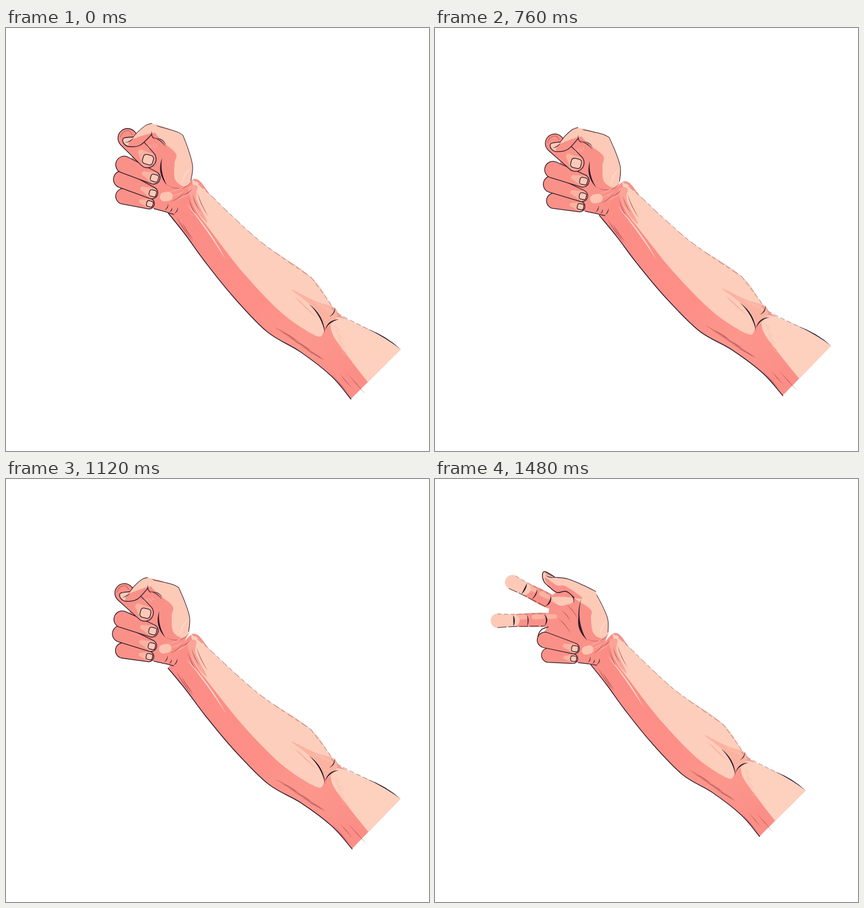
An HTML page with a canvas for the animation above (1.66 s loop, 748 by 749 pixels).

```html
<!DOCTYPE html>
<html lang="en">
<head>
<meta charset="utf-8">
<title>Fist game arm</title>
<style>
html, body { margin: 0; width: 100%; height: 100%; overflow: hidden; background: #fff; }
canvas { display: block; width: 748px; height: 749px; }
</style>
</head>
<body>
<canvas id="stage" width="748" height="749"></canvas>
<script>
const ctx = document.getElementById("stage").getContext("2d");
const INK = "#2b1829", FAINT = "#8d6a6b", RED = "#b4545a";
const HAND = "#fa9188", SOFT = "#fbb3a1", LIGHT = "#fdcab7", PALE = "#fdd9ca";

const HOLD = 580, STEP = 180, STEPS = 6;
const ELBOW = [610, 657], NAIL = [252, 234];   // pivots of arm and hand

// Each pivot: x, y, turn in degrees, scale
const POSES = [
  { arm: [610, 657, 0, 1], hand: [252, 234, 0, 1] },
  { arm: [506, 718, 13, .97], hand: [312, 232, 56, .97] },
  { arm: [615, 651, -1, .987], hand: [250.5, 240.5, -3.4, .985] },
  { arm: [515, 709, 13, .97], hand: [302.5, 220.5, 42.4, .97] },
  { arm: [612, 655, -1, .99], hand: [247.5, 238.5, -2.8, .985] },
  { arm: [528, 696, 13, .97], hand: [298, 209, 28.4, .975] },
  { arm: [574, 633, 0, .925], hand: [233, 248, -8, .92], open: true }
];

// Both edges of the arm, from wrist to cut
const UNDER = [[287, 328], [318, 367], [352, 414], [402, 476], [462, 538], [520, 573], [575, 616], [610, 657]];
const UPPER = [[331, 268], [364, 298], [400, 333], [455, 382], [540, 442], [585, 504], [648, 537], [698, 569]];
const THUMB_SIDE = [[258, 171], [300, 183], [313, 190], [313, 190], [323, 217], [330, 245], [327, 270]];

const mix = (a, b, k) => a.map((v, i) => v + (b[i] - v) * k);
const across = (i, k) => mix(UNDER[i], UPPER[i], k);

// Smooth path through points; a doubled point makes a corner.
function curve(p, closed) {
  const n = p.length, path = new Path2D();
  const get = i => closed ? p[(i + n) % n] : p[Math.max(0, Math.min(n - 1, i))];
  path.moveTo(...p[0]);
  for (let i = 0; i < (closed ? n : n - 1); i++) {
    const [a, b, c, d] = [-1, 0, 1, 2].map(k => get(i + k));
    if (b[0] === c[0] && b[1] === c[1]) continue;
    path.bezierCurveTo(b[0] + (c[0] - a[0]) / 6, b[1] + (c[1] - a[1]) / 6,
      c[0] - (d[0] - b[0]) / 6, c[1] - (d[1] - b[1]) / 6, ...c);
  }
  return path;
}

function blob(points, color) {
  ctx.fillStyle = color;
  ctx.fill(curve(points, true));
}

function line(points, width = 1.4, color = INK, dash = []) {
  ctx.strokeStyle = color;
  ctx.lineWidth = width;
  ctx.setLineDash(dash);
  ctx.stroke(curve(points));
  ctx.setLineDash([]);
}

// Stroke with pointed ends; bend shifts its middle sideways.
function brush([x0, y0], [x1, y1], bend = 0, w = 1.2, color = INK) {
  const len = Math.hypot(x1 - x0, y1 - y0);
  const nx = (y0 - y1) / len, ny = (x1 - x0) / len;
  const cx = (x0 + x1) / 2, cy = (y0 + y1) / 2;
  ctx.fillStyle = color;
  ctx.beginPath();
  ctx.moveTo(x0, y0);
  for (const [side, x, y] of [[w, x1, y1], [-w, x0, y0]]) {
    const b = bend * 2 + side;
    ctx.quadraticCurveTo(cx + nx * b, cy + ny * b, x, y);
  }
  ctx.fill();
}

// Rows of strokes between two lines of starting points
function hatch(count, from, to, reach, bend, w, color) {
  for (let i = 0; i < count; i++) {
    const p = mix(from, to, i / (count - 1)), k = i % 2 ? .7 : 1;
    brush(p, [p[0] + reach[0] * k, p[1] + reach[1] * k], bend, w, color);
  }
}

function capsule([x0, y0], r0, [x1, y1], r1) {
  const a = Math.atan2(y1 - y0, x1 - x0), q = Math.PI / 2;
  const path = new Path2D();
  path.arc(x0, y0, r0, a + q, a + 3 * q);
  path.arc(x1, y1, r1, a - q, a + q);
  path.closePath();
  return path;
}

function place([x, y, turn, scale], pivot) {
  ctx.translate(x, y);
  ctx.rotate(turn * Math.PI / 180);
  ctx.scale(scale, scale);
  ctx.translate(-pivot[0], -pivot[1]);
}

function drawArm() {
  const tone = ctx.createLinearGradient(330, 340, 600, 620);
  tone.addColorStop(0, "#fb8d86");
  tone.addColorStop(.5, "#fd8f87");
  tone.addColorStop(.75, "#fc978c");
  tone.addColorStop(1, "#fb8f87");
  const cut = UPPER[7], end = UNDER[7], wrist = UNDER[0];
  blob([...UPPER, cut, end, ...UNDER.toReversed(), wrist], tone);

  // lit side: the shade gets narrower towards the elbow
  const shade = [4, 3, 2, 1].map(i => across(i, .6 - .065 * i));
  blob([...UPPER.slice(0, 5), [571, 484], [581, 502], [564, 516], [561, 540], [546, 544], ...shade, [335, 295]], "#fdcebb");
  blob([[585, 512], ...UPPER.slice(6), cut, across(7, .34), across(7, .34), across(6, .42), [576, 538]], "#fdd1be");

  // inner elbow
  blob([[505, 463], [548, 484], [580, 495], [586, 510], [566, 530], [553, 504], [530, 483]], SOFT);
  hatch(5, [508, 474], [528, 494], [22, 19], 0, .9, "#f7a091");
  hatch(7, [546, 483], [572, 496], [8, 11], 0, 1, LIGHT);
  hatch(8, [577, 524], [592, 572], [16, 14], 0, 1, SOFT);
  brush([536, 489], [564, 541], -6, 2.4);
  brush([564, 535], [589, 516], -5, 2.2);
  brush([582, 494], [572, 511], -3, 1.4);

  // wrist tendons
  blob([[322, 284], [338, 280], [337, 303], [356, 344], [334, 318]], "#fba396");
  hatch(3, [322, 298], [338, 290], [20, 44], 2, 1.2, RED);
  brush([319, 311], [389, 411], -3, 2.4, PALE);
  brush([327, 304], [352, 347], 1, 1.2, PALE);
  hatch(2, [301, 334], [311, 344], [30, 45], 1, 1.4, RED);

  // underside
  hatch(6, [473, 529], [530, 570], [46, 27], -1, 1, RED);
  hatch(3, [575, 612], [603, 611], [33, 38], 0, 1.1, RED);
  line(UNDER, 1.5);
  line(UPPER.slice(0, 5), .9, FAINT, [6, 7, 11, 6]);
  line([UPPER[4], [571, 484], ...UPPER.slice(5, 7)], .9, FAINT, [8, 5]);
  brush([640, 533], cut, -2.5, 1.8);
}

function drawPalm() {
  const heel = [[262, 320], [284, 326], [297, 330]];
  blob([...THUMB_SIDE, [311, 303], heel[2], ...heel.toReversed(), [235, 305], [222, 245], [228, 215], [242, 192]], HAND);
  blob([...THUMB_SIDE, [316, 281], [299, 268], [298, 240], [300, 222], [272, 196]], LIGHT);
  brush([328, 247], [311, 276], 3, 2.4, PALE);
  brush([276, 230], [285, 279], 6, 3);
  brush([284, 277], [331, 269], 11, 1.3, RED);
  hatch(3, [289, 290], [296, 304], [32, -13], 2, 1.6, SOFT);
  hatch(2, [292, 307], [312, 296], [24, -16], 2, 1.3, RED);
  ctx.fillStyle = "#fdc5b1";
  ctx.fill(new Path2D(capsule([280, 299], 8, [287, 298], 8)));
  hatch(3, [280, 323], [297, 329], [7, -12], 2, 1.2, INK);
  line(heel, 1.3);
  line(THUMB_SIDE, 1);
}

function curledFinger(knuckle, r0, tip, r1) {
  const shape = capsule(knuckle, r0, tip, r1);
  ctx.fillStyle = HAND;
  ctx.fill(shape);
  ctx.fillStyle = SOFT;
  ctx.fill(capsule(mix(knuckle, tip, .68), r1 * .35, tip, r1 * .85));
  ctx.strokeStyle = INK;
  ctx.lineWidth = 1.3;
  ctx.stroke(shape);

  ctx.save();
  ctx.translate(...mix(knuckle, tip, 1.03));
  ctx.rotate(.28);
  ctx.beginPath();
  ctx.roundRect(-r1 * .6, -r1 * .55, r1 * 1.2, r1 * 1.1, r1 * .35);
  ctx.fillStyle = LIGHT;
  ctx.fill();
  ctx.stroke();
  ctx.restore();
}

function drawLowFingers() {
  curledFinger([208, 298], 14, [253, 311], 9.5);
  curledFinger([205, 268], 15, [258, 292], 10.5);
}

function drawFist() {
  drawLowFingers();
  curledFinger([209, 242], 15, [261, 265], 11.5);
  curledFinger([215, 195], 17, [250, 232], 15.5);
  line([[202, 193], [208, 184], [218, 182], [223, 189]], 1, RED);

  // thumb folded over
  const top = [[225, 193], [234, 183], [248, 172], [258, 169]];
  const low = [[258, 188], [238, 207], [218, 210], [208, 204], [208, 195]];
  blob([...top, [274, 180], ...low], LIGHT);
  blob([[222, 198], [257, 186], ...low.slice(0, 3)], HAND);
  line([...low, top[0]]);
  line(top, 1);
  brush([210, 203], [226, 194], 2);
  brush([258, 182], [264, 198], 3);
  hatch(2, [258, 193], [266, 195], [24, 17], -3, 1.2, INK);
  hatch(4, [248, 207], [263, 204], [7, 10], 0, 1, LIGHT);
}

function spreadFinger(tip, base, r) {
  const fold = k => mix(tip, base, k);
  ctx.fillStyle = HAND;
  ctx.fill(capsule(fold(.3), 2, base, r));
  const side = Math.atan2(base[1] - tip[1], base[0] - tip[0]) + Math.PI / 2;
  const off = ([x, y], k) => [x + Math.cos(side) * r * k, y + Math.sin(side) * r * k];
  blob([off(fold(.3), -1), off(fold(.3), -1), off(base, -1), off(base, 1), off(fold(.3), 1), off(fold(.3), 1)], HAND);
  ctx.fillStyle = SOFT;
  for (const k of [.4, .7, .95]) ctx.fill(capsule(off(fold(k), -.5), r * .4, off(fold(k + .15), -.5), r * .35));
  ctx.fillStyle = LIGHT;
  ctx.fill(capsule(tip, r * 1.15, fold(.3), r));
  line([off(tip, 1.1), off(fold(.3), 1), off(fold(.9), 1)], 1, INK, [15, 4]);
  line([off(tip, -1.1), off(fold(.3), -1), off(fold(.9), -1)], .8, FAINT, [6, 6]);
  for (const [k, w] of [[.3, 2.6], [.56, 1.7], [.9, 2.3]]) brush(off(fold(k), -.9), off(fold(k), 1), -k * 4, w);
}

// Spread fingers, in stage coordinates
function drawOpenFingers() {
  blob([[207, 207], [240, 203], [252, 250], [225, 290], [184, 282], [198, 262]], HAND);
  spreadFinger([137, 183], [207, 219], 11.5);
  spreadFinger([111, 251], [203, 249], 11);
  blob([[208, 210], [241, 210], [243, 219], [220, 224]], LIGHT);
  line([[200, 262], [188, 267], [182, 279], [184, 290]]);
  hatch(3, [217, 246], [230, 220], [23, 28], -2, 1.1, RED);

  const low = [[246, 210], [232, 199], [216, 201], [203, 192], [193, 182], [190, 169], [195, 164], [212, 174]];
  const top = [[212, 174], [235, 177], [262, 188], [284, 199]];
  blob([...low, ...top.slice(1), [280, 215]], LIGHT);
  blob([...low.slice(0, 4), [194, 174], [215, 188], [231, 190], [260, 210]], HAND);
  brush([193, 165], [211, 173], 0, 4, "#d88f88");
  brush([195, 170], [212, 174], 2);
  line(low);
  line(top, 1.1);
  brush([239, 204], [245, 220], -3);
  brush([259, 211], [269, 287], 9, 2);
}

function draw(pose) {
  ctx.setTransform(1, 0, 0, 1, 0, 0);
  ctx.fillStyle = "#fff";
  ctx.fillRect(0, 0, 748, 749);
  ctx.lineCap = ctx.lineJoin = "round";

  ctx.save();
  place(pose.arm, ELBOW);
  drawArm();
  ctx.restore();

  ctx.save();
  place(pose.hand, NAIL);
  drawPalm();
  if (!pose.open) drawFist();
  ctx.restore();

  if (pose.open) {
    drawOpenFingers();
    place(pose.hand, NAIL);
    drawLowFingers();
  }
}

const start = performance.now();
function tick() {
  const t = (performance.now() - start) % (HOLD + STEP * STEPS);
  draw(POSES[t < HOLD ? 0 : 1 + Math.floor((t - HOLD) / STEP)]);
  requestAnimationFrame(tick);
}
tick();
</script>
</body>
</html>
```
